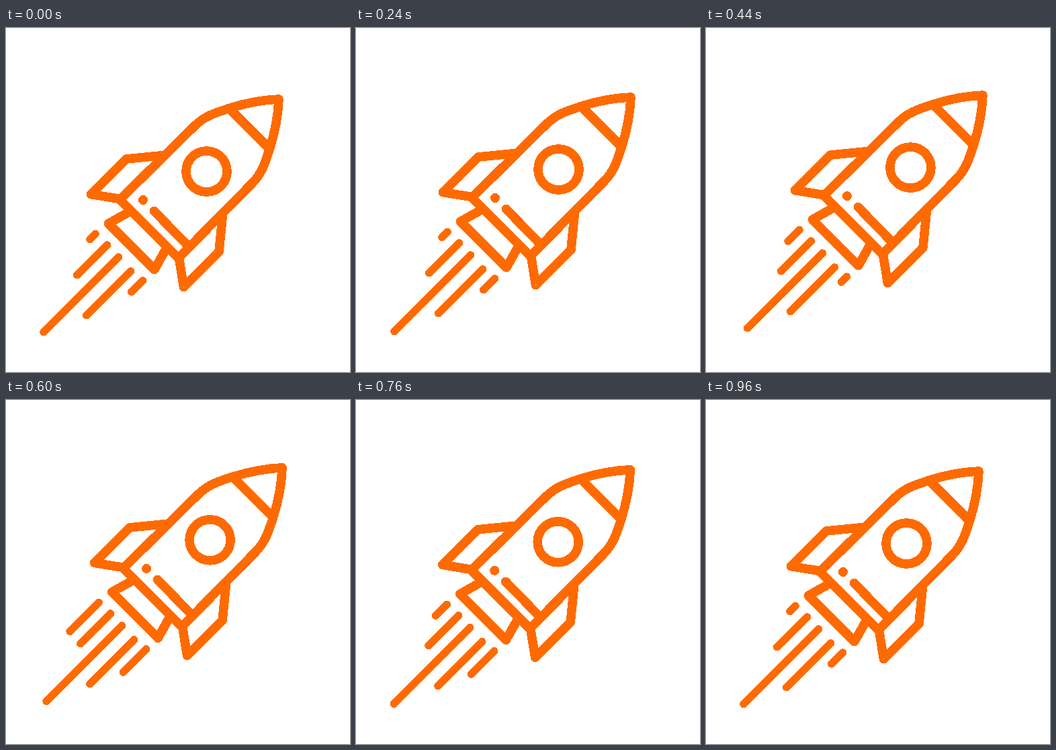
An HTML page for the animation above (1000 ms loop, 512 by 512 pixels).

```html
<!DOCTYPE html>
<html lang="en">
<head>
<meta charset="utf-8">
<title>Rocket</title>
<style>
  html, body { margin: 0; width: 100%; height: 100%; overflow: hidden; background: #fff; }
  svg { display: block; width: 100vw; height: 100vh; shape-rendering: crispEdges; }
  .ink { fill: none; stroke: #ff6a00; stroke-width: 13.6; stroke-linecap: round; stroke-linejoin: round; }
  #trails { stroke-width: 11.6; }
</style>
</head>
<body>
<svg viewBox="0 0 512 512">
  <g id="ship" class="ink">
    <path d="M169.5 255.5 L281 145.5 C297 130 313 126 332 119.5 C356 112 380 107 406 106
             C405 132 400 156 392.5 180 C386 199 382 215 366.5 231 L256.5 342.5 Z"/>
    <path d="M332 119.5 L392.5 180"/>
    <circle cx="298.5" cy="213.5" r="30.5"/>
    <path d="M234 189.5 L179 195 L126.5 247.5 L169.5 254.5"/>
    <path d="M322.5 278 L317 333 L264.5 385.5 L257.5 342.5"/>
    <path d="M182 274.5 L152.5 291 L221 359.5 L237.5 330"/>
    <path d="M220.5 272.5 L271.5 325"/>
    <circle cx="204" cy="256" r="7" fill="#ff6a00" stroke="none"/>
  </g>
  <g id="trails" class="ink"></g>
</svg>
<script>
  const STEP = 40, STEPS = 25, LIFT = 6;
  const ship = document.getElementById('ship');
  const trails = document.getElementById('trails');

  // Smooth wave from 0 to 1 and back over one turn
  const wave = turn => (1 - Math.cos(turn * 2 * Math.PI)) / 2;
  const flicker = turn => 8 + 35 * wave(turn);

  // Start point and length along the flight diagonal
  const lines = [
    { x: 133, y: 306.5, len: u => flicker(u * 4) },
    { x: 150.5, y: 323, len: () => 44.7 },
    { x: 167.5, y: 341, len: u => 111.5 + 2 * wave(u * 2) },
    { x: 185.5, y: 362, len: () => 65.7 },
    { x: 203.5, y: 376, len: u => flicker(u * 4 + 1 / 6) }
  ];
  for (const line of lines) {
    line.el = document.createElementNS('http://www.w3.org/2000/svg', 'path');
    trails.append(line.el);
  }

  function draw(now) {
    const u = Math.floor(now / STEP) % STEPS / (STEPS - 1);
    const d = LIFT * wave(u);
    const shift = `translate(${d} ${-d})`;
    ship.setAttribute('transform', shift);
    trails.setAttribute('transform', shift);
    for (const { x, y, len, el } of lines) {
      const n = len(u);
      el.setAttribute('d', `M${x} ${y} l${-n} ${n}`);
    }
  }

  const begin = performance.now();
  function tick() {
    draw(performance.now() - begin);
    requestAnimationFrame(tick);
  }
  tick();
</script>
</body>
</html>
```
